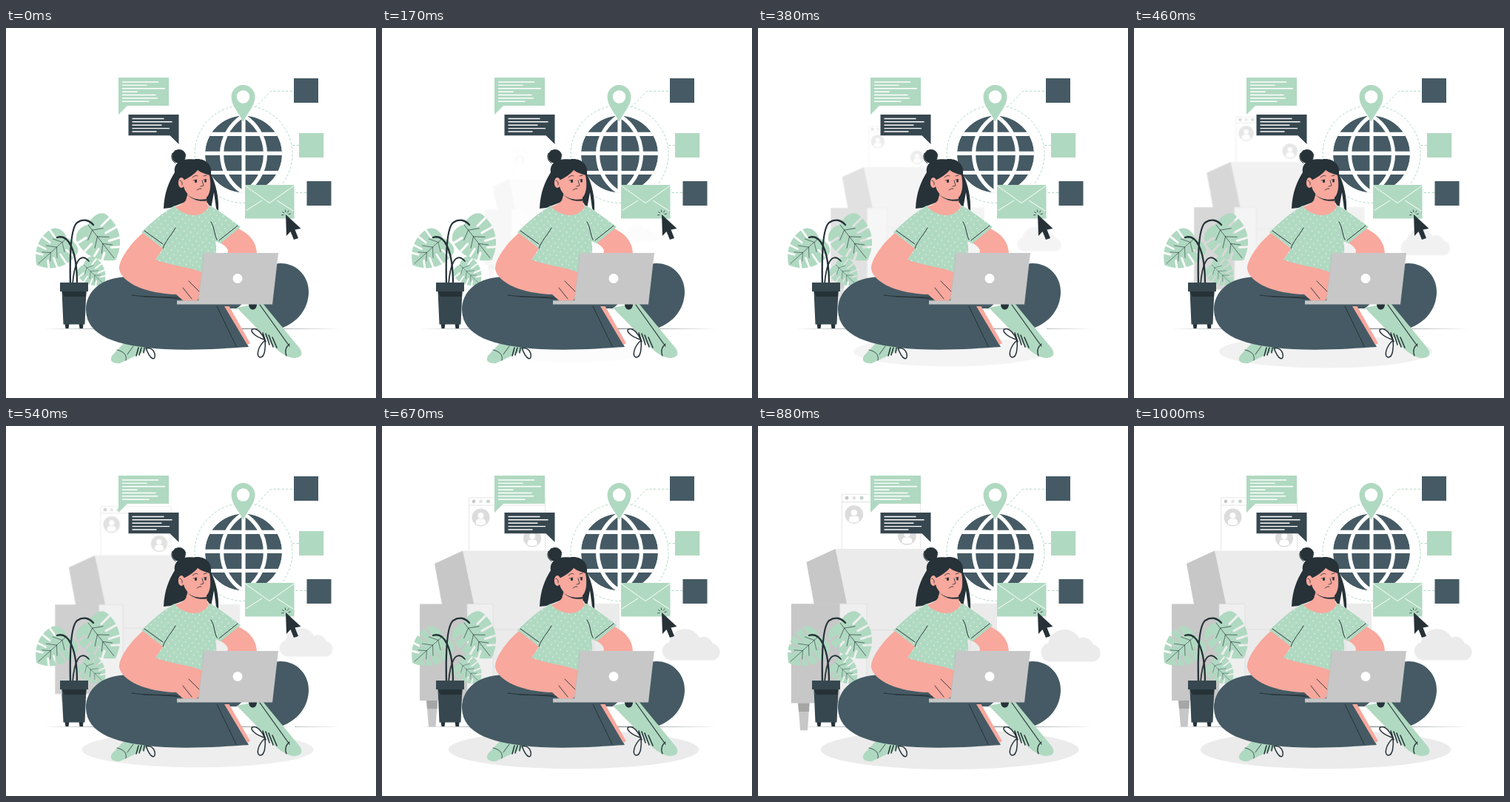
Recreate the animation shown at these times as an HTML page. Size 500x500 px, loop 1040 ms.

```html
<!DOCTYPE html>
<html lang="en">
<head>
<meta charset="utf-8">
<title>Working online</title>
<style>
  html, body { margin: 0; height: 100%; overflow: hidden; background: #fff; }
  svg { display: block; width: 100vw; height: 100vh; }
  .green { fill: #b0d9c1; }
  .slate { fill: #455a64; }
  .deep { fill: #37474f; }
  .ink { fill: #263238; }
  .skin { fill: #f8a89d; }
  .white { fill: #fff; }
  .pale { fill: #ebebeb; }
  .grey { fill: #c7c7c7; }
  .line { fill: none; stroke: #263238; stroke-linecap: round; stroke-linejoin: round; }
  .rule { fill: none; stroke: #fff; stroke-width: 1.4; }
  .dash { fill: none; stroke: #b0d9c1; stroke-dasharray: 3.2 2.4; }
</style>
</head>
<body>
<svg viewBox="0 0 500 500">
  <defs>
    <pattern id="dots" width="9" height="11" patternUnits="userSpaceOnUse" patternTransform="rotate(8)">
      <circle class="white" cx="2" cy="2" r=".65"/>
      <circle class="white" cx="6.5" cy="7.5" r=".65"/>
    </pattern>
    <clipPath id="disc"><circle cx="321" cy="170.5" r="52"/></clipPath>
    <mask id="cuts" maskUnits="userSpaceOnUse" x="-20" y="-40" width="100" height="80">
      <rect class="white" x="-20" y="-40" width="100" height="80"/>
      <path id="slits" d="M12-13L10-31M23-12L26-31M34-9L41-27M43-6L52-19" stroke="#000" stroke-width="3" stroke-linecap="round"/>
      <use href="#slits" transform="scale(1 -1)"/>
    </mask>
    <g id="leaf">
      <path class="green" mask="url(#cuts)" d="M0 0C-7-10-5-27 6-28C22-31 46-28 60 0C45 25 23 28 12 26C-1 26-6 10 0 0"/>
      <path class="line" stroke-width=".6" d="M0 0H56M9 0L16-13M20 0L30-12M32 0L41-9M9 0L16 13M20 0L30 12M32 0L41 9"/>
    </g>
    <g id="avatar">
      <circle r="12" fill="#dcdcdc"/>
      <circle class="white" cy="-2.5" r="4"/>
      <path class="white" d="M-6.5 9V7C-6.5 2-4 2 0 2S6.5 2 6.5 7V9Q0 12-6.5 9"/>
    </g>
  </defs>

  <ellipse id="shadow" class="pale" cx="259" cy="437.3" rx="169.3" ry="26"/>
  <path class="ink" d="M49 406.5L250 406.1L453 406.5L250 406.9Z"/>

  <g id="room">
    <path fill="#fff" stroke="#e6e6e6" d="M117.5 97H220.5V200H117.5ZM117.5 107H220.5"/>
    <circle class="grey" cx="124" cy="101.8" r="2.4"/>
    <circle cx="133.5" cy="101.8" r="2.4" fill="#e3e3e3"/>
    <circle cx="143.5" cy="101.8" r="2.4" fill="#c2d3ca"/>
    <use href="#avatar" x="133.5" y="123.5"/>
    <use href="#avatar" x="203" y="151.5"/>
    <path class="grey" d="M71 186L109 168.5L130 241H81Z"/>
    <path class="pale" d="M109 168.5H240V240H321V355H124V240Z"/>
    <path class="grey" d="M51 240.5H116V371H51Z"/>
    <path fill="#efefef" stroke="#dcdcdc" stroke-width=".7" d="M115 240.5H150V371H115Z"/>
    <path fill="none" stroke="#dadada" stroke-width=".7" d="M150 275H286M286 240V350"/>
    <path class="grey" d="M60 371H75L72.5 406.5H63Z"/>
    <path fill="#a6a6a6" d="M60 371H75L74.5 382H61Z"/>
    <path class="pale" d="M390 316.5A12.5 12.5 0 0 1 388 292A22 22 0 0 1 429 286A13 13 0 0 1 447 294A11.5 11.5 0 0 1 448 316.5Z"/>
  </g>

  <!-- messages -->
  <path class="green" d="M152 67H220V105H164L152 117Z"/>
  <path class="rule" d="M157 73H206M157 77.4H190.5M157 81.8H215M157 86.2H177.5M157 90.5H202.5M157 94.8H205M157 99.2H193.5"/>
  <path class="deep" d="M165.5 117H233.5V157L221.5 145.3H165.5Z"/>
  <path class="rule" d="M170.5 122.5H213.5M170.5 126.8H224.5M170.5 131.2H210.5M170.5 135.6H221M170.5 140H203.5"/>

  <!-- globe and network -->
  <circle class="dash" cx="321" cy="170.5" r="66"/>
  <path class="dash" d="M337 107L358 85.3H389M387 158.5H396M386 222.5H407"/>
  <g clip-path="url(#disc)">
    <circle class="slate" cx="321" cy="170.5" r="52"/>
    <g fill="none" stroke="#fff" stroke-width="5.2">
      <path d="M321 110V230M260 143.3H380M260 169.4H380M260 195.5H380"/>
      <path d="M321 118.5A60.6 60.6 0 0 0 321 222.5A60.6 60.6 0 0 0 321 118.5"/>
    </g>
  </g>
  <path class="green" d="M320.5 127C316 116 304.5 106 304.5 93A16 16 0 0 1 336.5 93C336.5 106 325 116 320.5 127"/>
  <circle class="white" cx="320.5" cy="93" r="8.7"/>
  <path class="slate" d="M389 68H422V101H389ZM406.500 207H439.500V240H406.500Z"/>
  <path class="green" d="M396 142H429.200V175H396Z"/>
  <path class="green" d="M323 212H389.5V257.5H323Z"/>
  <path class="rule" style="stroke-width:1" d="M323 213L356 236.5L389.5 213M324 247L346 233M366 233L388 247"/>
  <path class="ink" d="M378 252L398.5 271L390.5 272.5L395 284L389 286L384.5 275L379 281Z"/>
  <path class="line" stroke-width=".8" d="M375 252.5L372.5 253M375.5 249.8L373.5 248.5M377.8 248.5L377.3 246M380.5 249L382 247M382 251.5L384.5 251"/>

  <!-- plant -->
  <use href="#leaf" transform="translate(82 284) rotate(138) scale(.91)"/>
  <use href="#leaf" transform="translate(111 266) rotate(52) scale(1.01)"/>
  <use href="#leaf" transform="translate(105 320) rotate(44) scale(.64)"/>
  <path class="line" stroke-width="2.3" d="M87 346C86 306 88 270 96 263C105 257 113 260 118 266M96 346C96 299 84 278 69 283"/>
  <path class="line" stroke-width="1.8" d="M90 346C92 320 99 301 112 315"/>
  <path class="ink" d="M79.5 399H85.5L84.5 406H80.5ZM98.5 399H104.5L104 406H99.5Z"/>
  <path class="deep" d="M75.5 355H108.5L106.5 400.5H77.5ZM73 344H111V356H73Z"/>
  <path class="ink" d="M75.5 356H108.5L108 363H79Z"/>

  <!-- boots and legs -->
  <path class="green" d="M160 425L143 443C139 451 146 454 154 453C165 448 180 441 196 432Z"/>
  <path class="line" stroke-width=".8" d="M150 435C159 437 164 442 162 449M172 430L164 441"/>
  <path class="line" stroke-width="1.5" d="M179 432L176 443M183 432L180 442M187 432L186 439M189 432C195 450 203 450 201 440C199 433 192 432 189 432"/>
  <path class="slate" d="M345 335C352 322 361 318 371 318C394 318 410 337 409 358C408 382 392 398 374 405L340 372Z"/>
  <path class="slate" d="M185 338C136 330 108 352 108 381C109 416 148 430 215 434C258 436 296 433 328 431L296 374L250 350Z"/>
  <path class="slate" d="M290 372H320L312 379L298 379Z"/>
  <path class="skin" d="M295 376H301.5L330 426L326 428Z"/>
  <path class="line" stroke-width="1" d="M170 361C190 364 212 363 236 366M186 363L232 364M285 376L311 430"/>
  <path class="green" d="M312 378L346 371L397 433C402 441 399 446 388 446C376 444 364 435 352 419Z"/>
  <path class="line" stroke-width="1.2" d="M343 374L383 430M379 443C376 436 379 430 383 427"/>
  <path class="ink" d="M328 373H339C339 383 328 383 328 373"/>
  <path class="line" stroke-width="1.5" d="M347 412L351 424M351 413L356 428M355 415L361 431M360 418L366 432M349 421C336 417 329 409 333 407C339 404 347 414 350 422C340 431 338 443 343 445C350 446 351 431 350 422"/>

  <!-- hair and head -->
  <path class="ink" d="M228 195C226 181 239 176 254 177.5C268 175 279 184 277 197C284 212 288 230 287 247L284 244L281 222L277 244L272 236L240 236L222 243L213 244C214 222 220 208 228 195"/>
  <circle class="ink" cx="233.5" cy="173.5" r="9.3"/>
  <path class="line" stroke-width="1" d="M225 169Q221 177 229 183M228 166Q240 161 243 172"/>
  <path class="skin" d="M246 222L243 233C238 239 232 240 226 243C238 259 265 262 277 243C271 240 271 235 271 225Z"/>
  <path class="ink" d="M245 225C252 231 262 233 271 231V233.500C260 235 250 231 245 225"/>
  <ellipse class="skin" cx="237" cy="209" rx="4.2" ry="7"/>
  <path class="skin" d="M239 206C247 203 255 197 259 192C264 196 270 197 275 199C277 210 277 221 272 228C265 233 254 232 248 227C243 222 239 216 239 206"/>
  <path class="line" stroke-width=".8" d="M235 206Q239 207 238 212M252 202Q256 198 259 200M267 200L271 199M265 206L267 213L263 214M258 219Q261 216 264 217"/>
  <ellipse class="ink" cx="256.5" cy="207" rx="1.6" ry="2.2"/>
  <ellipse class="ink" cx="269.5" cy="206.5" rx="1.4" ry="2.2"/>
  <path class="line" stroke-width=".7" d="M253 206L258 205M267 205L271 204.5"/>

  <!-- body -->
  <path class="skin" d="M314 271C330 279 339 290 339 306H298C301 302 301 299 295 294L288 289Z"/>
  <g class="green">
    <path id="shirt" d="M228 240C235 252 265 262 275 239.5C290 248 304 259 317 269L290 291L283 288C286 302 283 318 276 332L240 328L201 314L212 298L183 276C195 264 211 250 228 240"/>
  </g>
  <use href="#shirt" fill="url(#dots)"/>
  <path class="line" stroke-width="1" d="M229 270C223 281 215 288 212 298M187 274L212 292M277 262C282 270 281 278 285 286M313 267L288 287"/>
  <path class="skin" d="M185 277C166 293 152 315 153 326C157 345 190 359 230 360L240 369H258C268 355 270 337 264 330C246 322 224 322 202 313L212 298Z"/>
  <path class="line" stroke-width=".9" d="M239 351L251 366M247 342L261 356"/>

  <!-- laptop -->
  <path class="grey" d="M267.5 304H368L360 373.5H231V368.5H260Z"/>
  <path fill="none" stroke="#b5b5b5" stroke-width=".6" d="M231 368.5H260L267.5 304"/>
  <circle class="white" cx="313" cy="338.5" r="6.5"/>
</svg>
<script>
  const LOOP = 1040, STEP = 1000 / 24, STEPS = 25;
  const room = document.getElementById('room');
  const shadow = document.getElementById('shadow');

  const bezier = (a, b, u) => 3 * a * u * (1 - u) ** 2 + 3 * b * u * u * (1 - u) + u ** 3;

  // cubic-bezier(.36, -.01, .5, 1.38), solved by bisection
  function ease(x) {
    let lo = 0, hi = 1;
    for (let i = 0; i < 30; i++) {
      const mid = (lo + hi) / 2;
      if (bezier(.36, .5, mid) < x) lo = mid; else hi = mid;
    }
    return bezier(-.01, 1.38, lo);
  }

  function zoom(el, x, y, p) {
    el.setAttribute('transform', `translate(${x} ${y}) scale(${.5 + p / 2}) translate(${-x} ${-y})`);
    el.setAttribute('opacity', Math.min(1, Math.max(0, p)));
  }

  const start = performance.now();
  function draw() {
    const t = (performance.now() - start) % LOOP;
    const step = Math.min(STEPS - 1, Math.floor((t + 3) / STEP));
    const p = ease((step + 1) / STEPS);
    zoom(room, 255.5, 252, p);
    zoom(shadow, 259, 437.3, p);
    requestAnimationFrame(draw);
  }
  draw();
</script>
</body>
</html>
```
